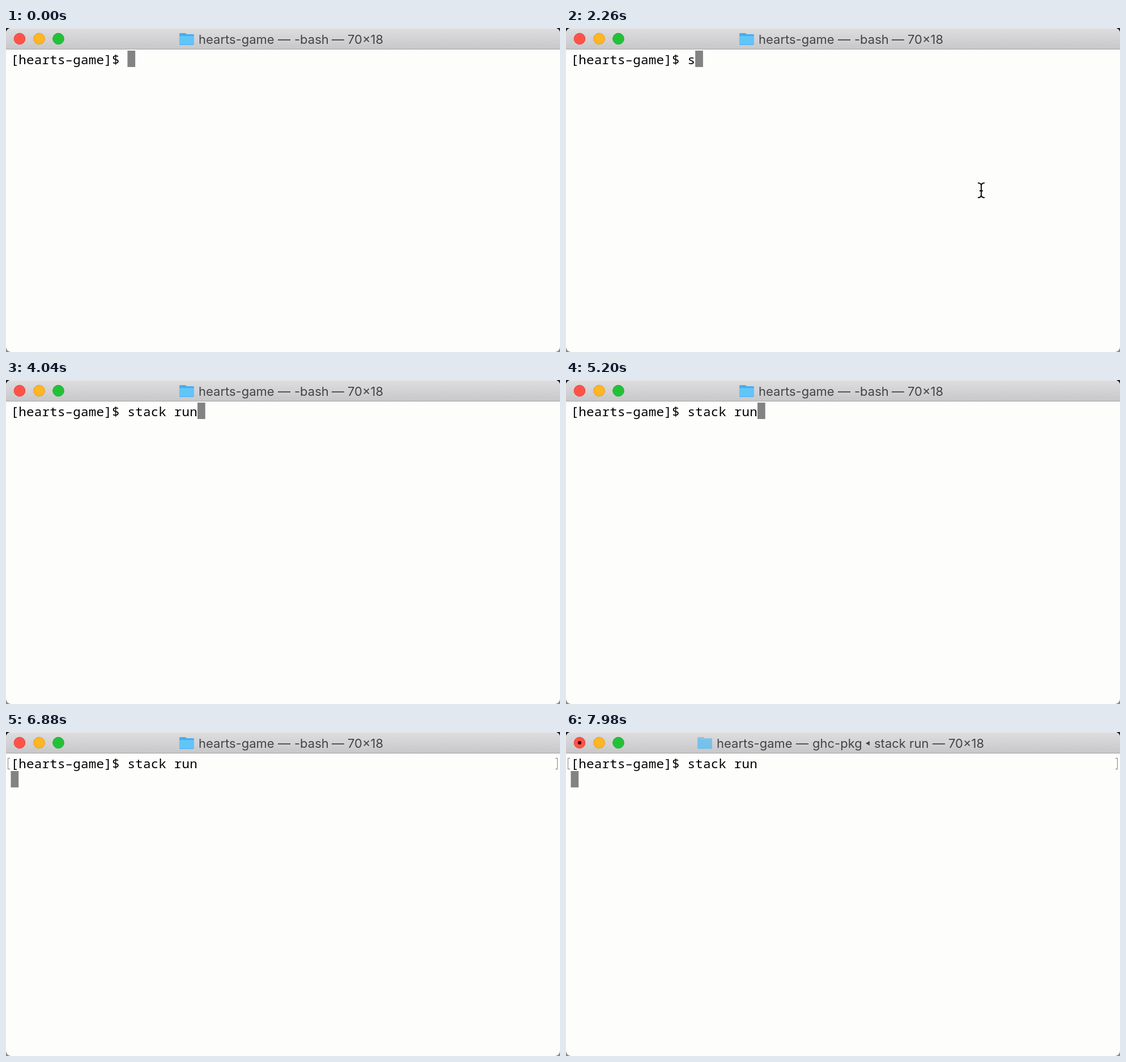
Animation, 978 px wide and 573 px high, one loop 8 s. Source, as an HTML page with a canvas:

```html
<!DOCTYPE html>
<html lang="en">
<head>
<meta charset="utf-8">
<title>Terminal</title>
<style>
html, body { margin: 0; width: 100%; height: 100%; overflow: hidden; background: #222; }
canvas { display: block; }
</style>
</head>
<body>
<canvas id="stage" width="978" height="573"></canvas>
<script>
const W = 978, H = 573, LOOP = 8000;
const ctx = document.getElementById("stage").getContext("2d");

const CELL = 13.73, LEFT = 8.5, ROW = 29, TOP = 40;
const PROMPT = "[hearts-game]$ ";
const COMMAND = "stack run";
const KEY_TIMES = [700, 2360, 2620, 2860, 3360, 3500, 3680, 3820, 3960];
const ENTER = 6100, STARTED = 7060, CHILD = 7700;

// Pointer path: time, x, y
const POINTER = [[1240, 853, 440], [1640, 783, 388], [1960, 733, 287], [2360, 733, 287]];

// Each title: folder x, then words with their left edges
const TITLES = {
  shell: [306, ["hearts-game", 340], ["—", 480], ["-bash", 509], ["—", 575], ["70×18", 603]],
  run: [286, ["hearts-game", 320], ["—", 460], ["stack run", 489], ["—", 593], ["70×18", 621]],
  child: [232, ["hearts-game", 266], ["—", 406], ["ghc-pkg", 435], ["◂", 529], ["stack run", 544], ["—", 647], ["70×18", 675]]
};

function rect(x, y, w, h, color) {
  ctx.fillStyle = color;
  ctx.fillRect(x, y, w, h);
}

function disc(x, y, r, fill, edge) {
  ctx.beginPath();
  ctx.arc(x, y, r, 0, Math.PI * 2);
  ctx.fillStyle = fill;
  ctx.fill();
  if (edge) {
    ctx.strokeStyle = edge;
    ctx.lineWidth = 1;
    ctx.stroke();
  }
}

function polyline(points, color, width) {
  ctx.beginPath();
  points.forEach(([x, y]) => ctx.lineTo(x, y));
  ctx.strokeStyle = color;
  ctx.lineWidth = width;
  ctx.stroke();
}

function drawFolder(x, faded) {
  ctx.globalAlpha = faded ? 0.5 : 1;
  ctx.fillStyle = "#43aeea";
  ctx.beginPath();
  ctx.roundRect(x, 9, 12, 8, 2);
  ctx.roundRect(x, 11, 26, 19, 2);
  ctx.fill();
  ctx.fillStyle = "#62c5fa";
  ctx.beginPath();
  ctx.roundRect(x, 14, 26, 15, 1.5);
  ctx.fill();
  ctx.globalAlpha = 1;
}

function drawTitle([folderX, ...words], faded) {
  drawFolder(folderX, faded);
  ctx.font = "22px Inter, Roboto, sans-serif";
  ctx.fillStyle = "#444346";
  for (const [word, x] of words) {
    if (word === "◂") {
      ctx.beginPath();
      ctx.moveTo(x, 20);
      ctx.lineTo(x + 7, 16);
      ctx.lineTo(x + 7, 24);
      ctx.fill();
    } else {
      ctx.fillText(word, x, 27.5);
    }
  }
}

function drawBar(t) {
  const shade = ctx.createLinearGradient(0, 0, 0, 37);
  shade.addColorStop(0, "#dedde0");
  shade.addColorStop(1, "#c8c7c9");
  rect(0, 0, W, 37, shade);
  rect(0, 0, W, 1, "#ececec");
  rect(0, 37, W, 1, "#a6a5a7");
  disc(24, 19, 9.8, "#ff5349", "#e2443c");
  disc(58.5, 19, 9.8, "#ffb524", "#e09d1c");
  disc(92.5, 19, 9.8, "#22c237", "#1aa82c");
  if (t >= STARTED) disc(24, 19, 3.2, "#4d0505");
  drawTitle(t < STARTED ? TITLES.shell : t < CHILD ? TITLES.run : TITLES.child, t >= CHILD);
}

function drawTerminal(t) {
  const typed = COMMAND.slice(0, KEY_TIMES.filter(k => t >= k).length);
  const line = PROMPT + typed;
  const entered = t >= ENTER;

  const col = entered ? 0 : line.length;
  rect(LEFT + col * CELL, TOP + (entered ? ROW : 0), CELL, ROW, "#838383");

  ctx.font = "22.6px 'Noto Sans Mono', 'DejaVu Sans Mono', monospace";
  ctx.fillStyle = "#000";
  // The dash spans nearly a full cell
  [...line].forEach((c, i) => ctx.fillText(c === "-" ? "–" : c, LEFT + i * CELL, 64));

  if (entered) {
    polyline([[7, 46.5], [3.5, 46.5], [3.5, 65.5], [7, 65.5]], "#999", 1.3);
    polyline([[970, 46.5], [973.5, 46.5], [973.5, 65.5], [970, 65.5]], "#999", 1.3);
  }
}

function pointerAt(t) {
  for (let i = 1; i < POINTER.length; i++) {
    const [t0, x0, y0] = POINTER[i - 1], [t1, x1, y1] = POINTER[i];
    if (t >= t0 && t < t1) {
      const p = (t - t0) / (t1 - t0);
      return [x0 + (x1 - x0) * p, y0 + (y1 - y0) * p];
    }
  }
  return null;
}

function drawPointer(t) {
  const pos = pointerAt(t);
  if (!pos) return;
  ctx.save();
  ctx.translate(...pos);
  ctx.beginPath();
  for (const s of [-1, 1]) {
    ctx.moveTo(-6, 13 * s);
    ctx.quadraticCurveTo(0, 13 * s, 0, 8 * s);
    ctx.quadraticCurveTo(0, 13 * s, 6, 13 * s);
  }
  ctx.moveTo(0, -9);
  ctx.lineTo(0, 9);
  ctx.moveTo(-3, 1);
  ctx.lineTo(3, 1);
  ctx.lineJoin = "round";
  ctx.strokeStyle = "#fff";
  ctx.lineWidth = 4;
  ctx.stroke();
  ctx.strokeStyle = "#111";
  ctx.lineWidth = 2;
  ctx.stroke();
  ctx.restore();
}

function draw(now) {
  const t = now % LOOP;
  rect(0, 0, W, H / 2, "#20202a");
  rect(0, H / 2, W, H / 2, "#8a8a8a");
  ctx.save();
  ctx.beginPath();
  ctx.roundRect(0, 0, W, H, 9);
  ctx.clip();
  rect(0, 0, W, H, "#fdfdfc");
  drawBar(t);
  drawTerminal(t);
  drawPointer(t);
  ctx.restore();
}

const start = performance.now();
function tick() {
  draw(performance.now() - start);
  requestAnimationFrame(tick);
}
tick();
</script>
</body>
</html>
```
